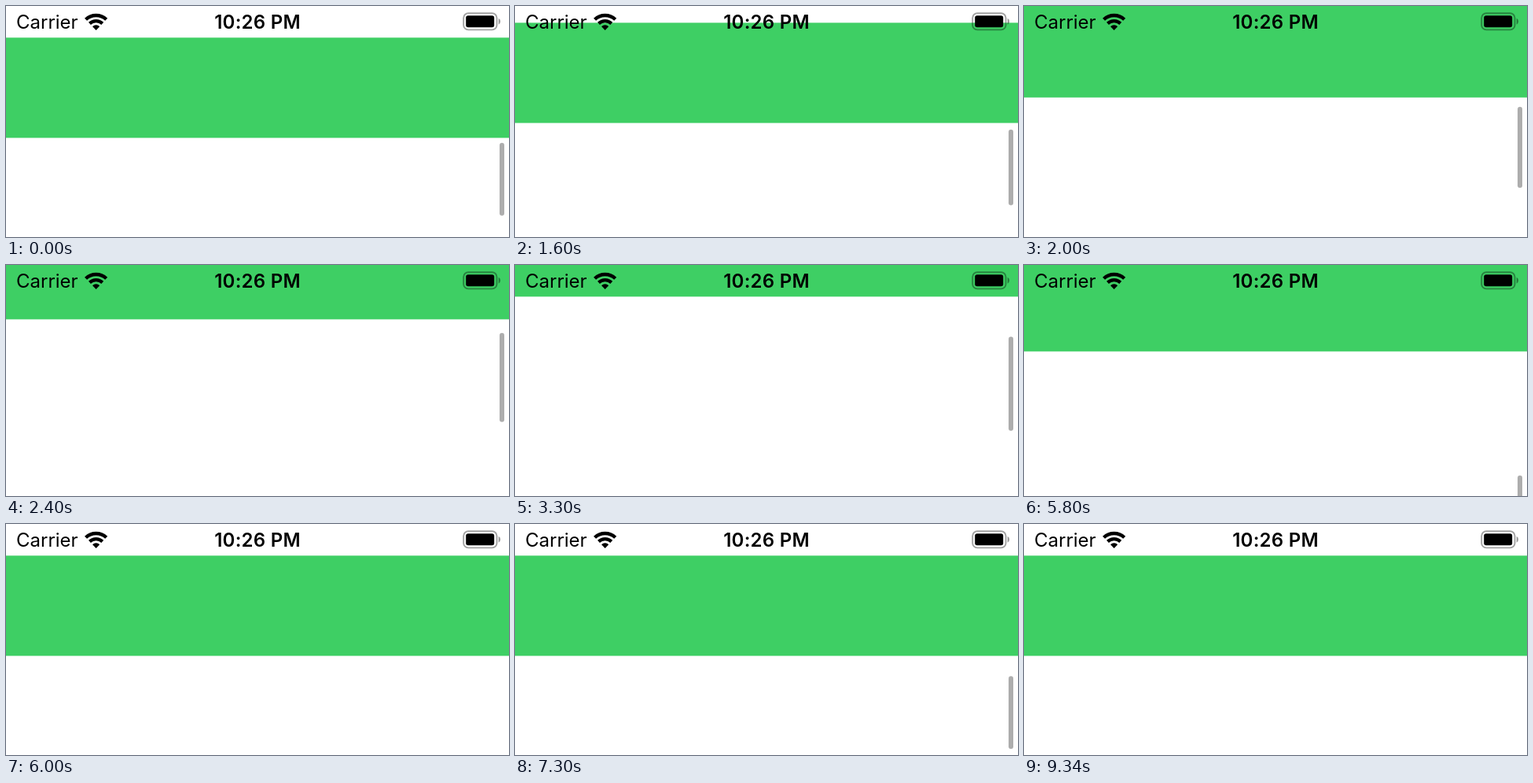
These frames come from a looping animation (640 by 295 pixels, 9430 ms). An HTML page:

```html
<!DOCTYPE html>
<html lang="en">
<head>
<meta charset="utf-8">
<title>Collapsing header</title>
<style>
  html, body { margin: 0; width: 100%; height: 100%; overflow: hidden; background: #fff; }
  svg { display: block; width: 640px; height: 295px; }
  text { font: 24px Inter, Roboto, sans-serif; }
  .time { font-weight: 600; text-anchor: middle; letter-spacing: .25px; }
</style>
</head>
<body>
<svg viewBox="0 0 640 295">
  <rect id="header" width="640" height="128" fill="#3ecf64"/>
  <text x="13" y="29">Carrier</text>
  <g id="wifi" fill="none" stroke="#000"></g>
  <text class="time" x="320" y="29">10:26 PM</text>
  <g>
    <rect x="582.2" y="9.2" width="42.3" height="21.2" rx="6" fill="none" stroke="#000" stroke-width="1.9" stroke-opacity=".37"/>
    <rect x="585.2" y="12.2" width="36" height="15.1" rx="2.8"/>
    <path d="M626.7 15.8q2.4 1.2 2.4 4t-2.4 4z" fill-opacity=".4"/>
  </g>
  <rect id="bar" x="628" width="6" rx="3" fill="#000" fill-opacity=".32"/>
</svg>
<script>
const LOOP = 9430, STEP = 50;
const OPEN = 168.4, CLOSED = 40.4, VIEW_BOTTOM = 1098, CONTENT = 9300;
const FURTHEST = 1502;
const LANDING = 7500, LANDING_SPEED = 0.95, SPRING = 0.0109;

// [time in ms, scroll offset in px]
const scrollKeys = [
  [1300, 0], [1600, 19], [2400, 99], [3200, 350], [4150, 914], [4700, FURTHEST],
  [5550, FURTHEST], [5800, 1432], [6000, 1372], [6400, 1205], [6750, 670],
  [7000, 670], [7300, 195], [LANDING, 0]
];
const header = document.getElementById('header');
const bar = document.getElementById('bar');

const clamp = (v, lo, hi) => Math.min(hi, Math.max(lo, v));

const rate = i => (scrollKeys[i + 1][1] - scrollKeys[i][1]) / (scrollKeys[i + 1][0] - scrollKeys[i][0]);

// Monotone tangents: harmonic mean of the neighbouring rates.
const tangents = scrollKeys.map((_, i) => {
  if (i === 0) return 0;
  if (i === scrollKeys.length - 1) return -LANDING_SPEED;
  const a = rate(i - 1), b = rate(i);
  return a * b > 0 ? 2 * a * b / (a + b) : 0;
});

// Scroll offset; negative while bouncing past the top.
function scrollAt(t) {
  if (t <= scrollKeys[0][0]) return 0;
  if (t >= LANDING) {
    const s = t - LANDING;
    return s > 600 ? 0 : -LANDING_SPEED * s * Math.exp(-SPRING * s);
  }
  const i = scrollKeys.findIndex(key => key[0] > t) - 1;
  const [t0, y0] = scrollKeys[i], [t1, y1] = scrollKeys[i + 1];
  const d = t1 - t0, u = (t - t0) / d, w = 1 - u;
  return y0 * (1 + 2 * u) * w * w + tangents[i] * d * u * w * w
       + y1 * u * u * (3 - 2 * u) - tangents[i + 1] * d * u * u * w;
}

function barOpacity(t) {
  if (t < 1350) return clamp(1 - t / 250, 0, 1);
  if (t < 9050) return 1;
  return t < 9200 ? 0.65 : t < 9340 ? 0.25 : 0;
}

function render(time) {
  const t = Math.floor(time / STEP) * STEP;
  const offset = scrollAt(t);
  const edge = t <= 4700 ? OPEN - offset : CLOSED + FURTHEST - offset;
  const bottom = clamp(edge, CLOSED, OPEN);
  header.setAttribute('y', bottom - 128);

  const view = VIEW_BOTTOM - bottom;
  const length = view * view / CONTENT + Math.min(0, offset);
  bar.setAttribute('y', bottom + 6.4 + Math.max(0, offset) * view / CONTENT);
  bar.setAttribute('height', Math.max(12, length));
  bar.setAttribute('opacity', barOpacity(t < 1350 ? t : time));
}

function drawWifi() {
  const cx = 114.6, cy = 30.9, k = Math.sin(Math.PI * 0.243), c = Math.cos(Math.PI * 0.243);
  const arc = r => `M${cx - r * k} ${cy - r * c}A${r} ${r} 0 0 1 ${cx + r * k} ${cy - r * c}`;
  document.getElementById('wifi').innerHTML =
    `<path d="${arc(18.9)}" stroke-width="4.4"/>` +
    `<path d="${arc(11.8)}" stroke-width="4.2"/>` +
    `<path d="${arc(6.6)}L${cx} ${cy}z" fill="#000" stroke="none"/>`;
}

drawWifi();
const start = performance.now();
function tick() {
  render((performance.now() - start) % LOOP);
  requestAnimationFrame(tick);
}
tick();
</script>
</body>
</html>
```
